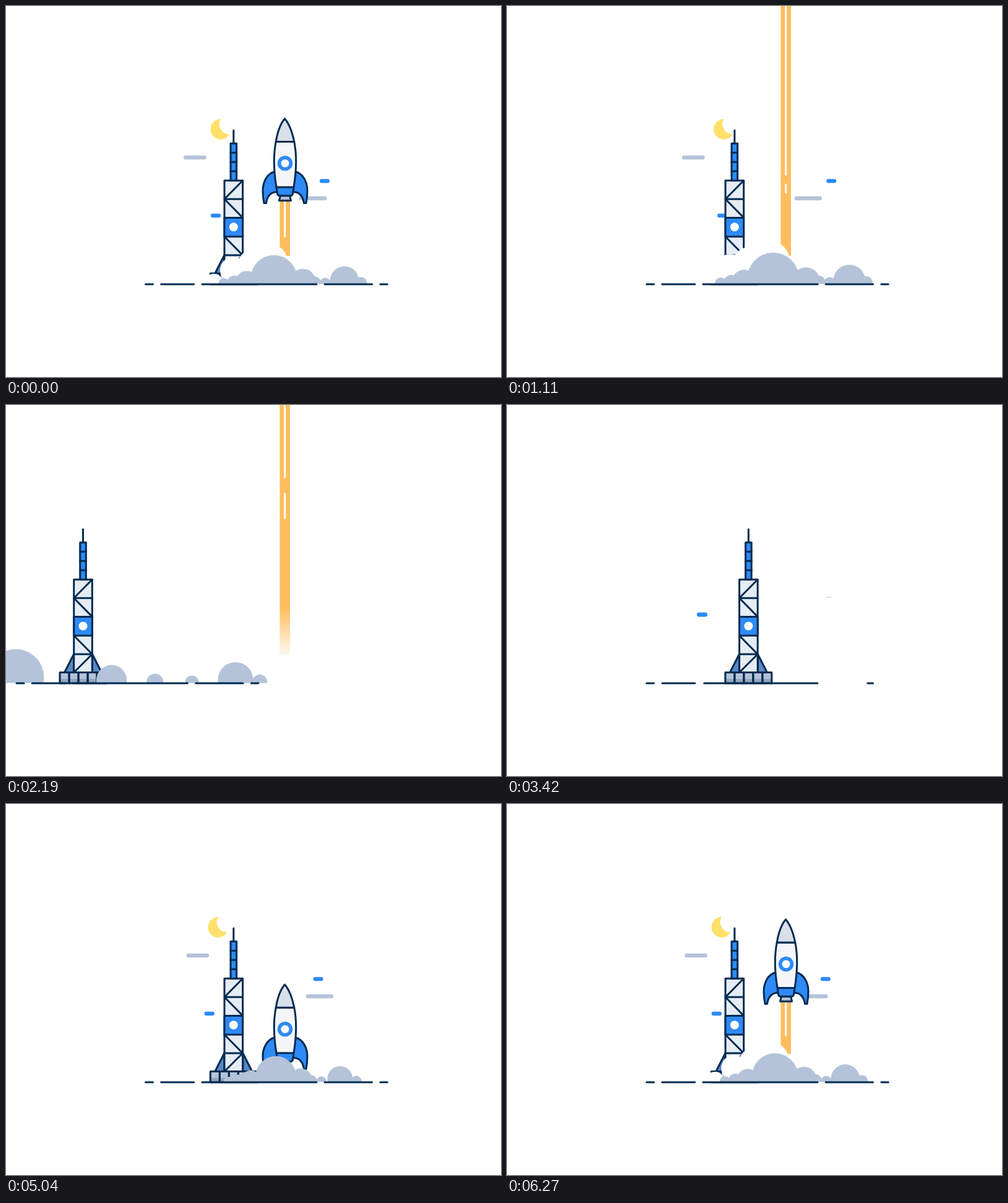
Recreate the animation shown at these times as an HTML page with a canvas. Size 800 by 600 pixels, loop 6300 ms.

```html
<!DOCTYPE html>
<html lang="en">
<head>
<meta charset="utf-8">
<title>Rocket launch</title>
<style>
html, body { margin: 0; width: 100%; height: 100%; overflow: hidden; background: #fff; }
canvas { display: block; }
</style>
</head>
<body>
<canvas id="stage" width="800" height="600"></canvas>
<script>
const ctx = document.getElementById('stage').getContext('2d');
const LOOP = 6.3, GROUND = 450;
const NAVY = '#002b50', BLUE = '#2e8af6', GREY = '#b4c3d9', PALE = '#e6ecf4', ORANGE = '#ffbe5e';

const clamp = v => Math.min(1, Math.max(0, v));
const easeOut = v => 1 - (1 - clamp(v)) ** 3;
const backOut = v => { const u = clamp(v) - 1; return 1 + 2.7 * u ** 3 + 1.7 * u * u; };
const leave = (t, start) => -939 * Math.max(0, t - start) ** 3;

function shape(d, fill, stroke = NAVY) {
  const path = new Path2D(d);
  if (fill) { ctx.fillStyle = fill; ctx.fill(path); }
  if (stroke) { ctx.strokeStyle = stroke; ctx.stroke(path); }
}

function disc(x, y, r, fill) {
  ctx.fillStyle = fill;
  ctx.beginPath();
  ctx.arc(x, y, Math.max(0, r), 0, 7);
  ctx.fill();
}

function line(x1, y1, x2, y2, colour, width = 3) {
  ctx.lineWidth = width;
  shape(`M${x1} ${y1}L${x2} ${y2}`, null, colour);
  ctx.lineWidth = 3;
}

function at(x, y, scale, draw) {
  ctx.save();
  ctx.translate(x, y);
  ctx.scale(scale, scale);
  draw();
  ctx.restore();
}

const cloud = (half, colour) => () => line(3.3 - half, 0, half - 3.3, 0, colour, 6.6);
const moon = () => shape('M0-16.5A16.5 16.5 0 1 0 14.3 8.3A16.5 16.5 0 0 1 0-16.5Z', '#ffe06a', null);

// from the lowest to the highest, in the order they appear
const skyItems = [
  { x: 339, y: 339, speed: 8.2, draw: cloud(8.2, BLUE) },
  { x: 496.2, y: 311, speed: -8.5, draw: cloud(22.3, GREY) },
  { x: 515, y: 283, speed: 8.3, draw: cloud(8, BLUE) },
  { x: 305.3, y: 245, speed: -3.6, draw: cloud(18.3, GREY) },
  { x: 347, y: 199.3, speed: 3.2, draw: moon }
];

function sky(t) {
  const shift = -560 * Math.max(0, t - 1.2) ** 2;
  skyItems.forEach(({ x, y, speed, draw }, i) => {
    const start = -2.77 - .43 * .29 ** i;
    const scale = backOut((t - start) / .4);
    if (scale > 0) at(x + speed * t + shift, y, scale, draw);
  });
}

function tower(t) {
  at(367.8 + 480 * (1 - easeOut((t + 3.23) / .549)) + leave(t, 1.5535), 0, 1, () => {
    shape('M-15 403L-30 432.5H-15ZM15 403L30 432.5H15Z', '#5b87c5');
    shape('M-14.8 282.3H14.8V432.5H-14.8Z', PALE);
    shape('M-14.8 342.4H14.8V373H-14.8Z', BLUE);
    shape('M14.8 282.3L-14.8 312.3H14.8M-14.8 312.3L14.8 342.4M-14.8 373L14.8 403H-14.8M14.8 403L-14.8 432.5');
    shape('M-4.8 222.3H4.8V282.3H-4.8Z', BLUE);
    for (let y = 237.3; y < 270; y += 15) line(-4.8, y, 4.8, y, NAVY);
    line(0, 201, 0, 222, NAVY);
    disc(0, 357.5, 7, '#fff');
    shape('M-37.5 432.5H37.5V450H-37.5Z', GREY, null);
    shape('M-37.5 443H37.5V450H-37.5Z', '#93a6be', null);
    for (let x = -37.5; x < 37; x += 15) shape(`M${x} 432.5h15V450h-15Z`);
  });
}

function climb(t) {
  const u = Math.max(0, t + 1.8);
  return 26.5 * (Math.exp(.98 * u) - 1) + 200 * Math.max(0, t - .66) ** 2;
}

function flame(t, nozzle) {
  const u = t - 2.19, fadeLength = 85;
  const tail = 328 - 190 * u - (u > 0 ? 2600 * u * u : 0);
  const top = Math.max(-5, nozzle);
  const bottom = Math.min(449 - 45 * clamp(t + 1.2), tail + fadeLength);
  if (bottom <= top) return;
  const fade = ctx.createLinearGradient(0, tail, 0, tail + fadeLength);
  fade.addColorStop(0, ORANGE);
  fade.addColorStop(1, 'rgba(255,190,94,0)');
  ctx.fillStyle = fade;
  ctx.fillRect(442.4, top, 16.6, bottom - top);

  const first = 374 - 62 * t - 25 * t * t;
  if (first > top) line(450.6, top - 3, 450.6, first - 1.5, '#fff');
  const second = first + 13 + 10 * (t - 1.11), length = 16 + 24.5 * (t - 1.11);
  if (length > 3) line(450.6, second + 1.5, 450.6, second + length - 1.5, '#fff');
}

function rocket(y) {
  at(451, y, 1, () => {
    const fin = 'M-16 86C-30 89-36 104-36 117C-36 126-35 132-34 137H-30.5C-29 127-25 119-13 119Z';
    shape(fin, BLUE);
    ctx.save();
    ctx.scale(-1, 1);
    shape(fin, BLUE);
    ctx.restore();
    shape('M-7.5 125H7.5L9.5 133H-9.5Z', GREY);
    shape('M-14 111H14L12.5 121.5Q12 125 9 125H-9Q-12 125-12.5 121.5Z', BLUE);
    shape('M-14.8 37.8Q-21 69-14 111.3H14Q21 69 14.8 37.8Z', '#f4f5f8');
    shape('M-.5 .5Q-10.5 12-14.8 37.8H14.8Q9.5 12-.5 .5Z', '#d9e0ea');
    disc(0, 72.7, 12.2, BLUE);
    disc(0, 72.7, 6.5, '#fff');
  });
}

// puffs spread away from the rocket as they grow; the left ones blow off first
function puff(x, y, r, t, growth, colour) {
  const drift = 6 * Math.tanh((x - 455) / 50);
  const exit = 1.519 + .107 * Math.tanh((x - 491) / 50);
  disc(x + drift * t + leave(t, exit), y, r * (1 + growth * t), colour);
}

const heap = [[352, 8.6], [369, 11.7], [389, 17.6], [433, 37.5], [480, 20.3], [498, 11], [516, 9], [547, 23.4], [573.5, 10]];

function smoke(t) {
  const steam = easeOut((t + 1.25) / .9), pop = easeOut((t + 1.75) / .45);
  for (let i = 0; i < 4; i++) {
    const rise = Math.sqrt(i);
    puff(336 + 31 * i, 448 - 21 * rise, (15 + 6 * rise) * steam, t, .2, '#fff');
  }
  for (const [x, r] of heap) puff(x, 451 - .28 * r, r * pop, t, .1, GREY);
}

function ground(t) {
  let left = 225.5 + leave(t, 1.5855);
  [12, 53, 185, 76.5, 11.5].forEach((length, i) => {
    // the two dashes on the right wait for the tower
    const start = -3.25 + .02 * i + (i > 2 ? .294 : 0);
    const grown = easeOut((t - start) / .42), right = left + length;
    if (grown) line(right - length * grown, GROUND, right, GROUND, NAVY);
    left = right + 13.2;
  });
}

function draw(seconds) {
  // time 0 is mid-flight; the scene builds up at negative times
  const t = seconds < 2.8 ? seconds : seconds - LOOP;
  ctx.fillStyle = '#fff';
  ctx.fillRect(0, 0, 800, 600);
  ctx.lineWidth = 3;
  ctx.lineCap = ctx.lineJoin = 'round';
  sky(t);
  tower(t);
  const y = 310 - climb(t) + 142 * (1 - easeOut((t + 2.85) / .5));
  ctx.save();
  ctx.beginPath();
  ctx.rect(0, 0, 800, 449.5);
  ctx.clip();
  flame(t, y + 133);
  rocket(y);
  smoke(t);
  ctx.restore();
  ground(t);
}

function tick() {
  draw(performance.now() / 1000 % LOOP);
  requestAnimationFrame(tick);
}
tick();
</script>
</body>
</html>
```
